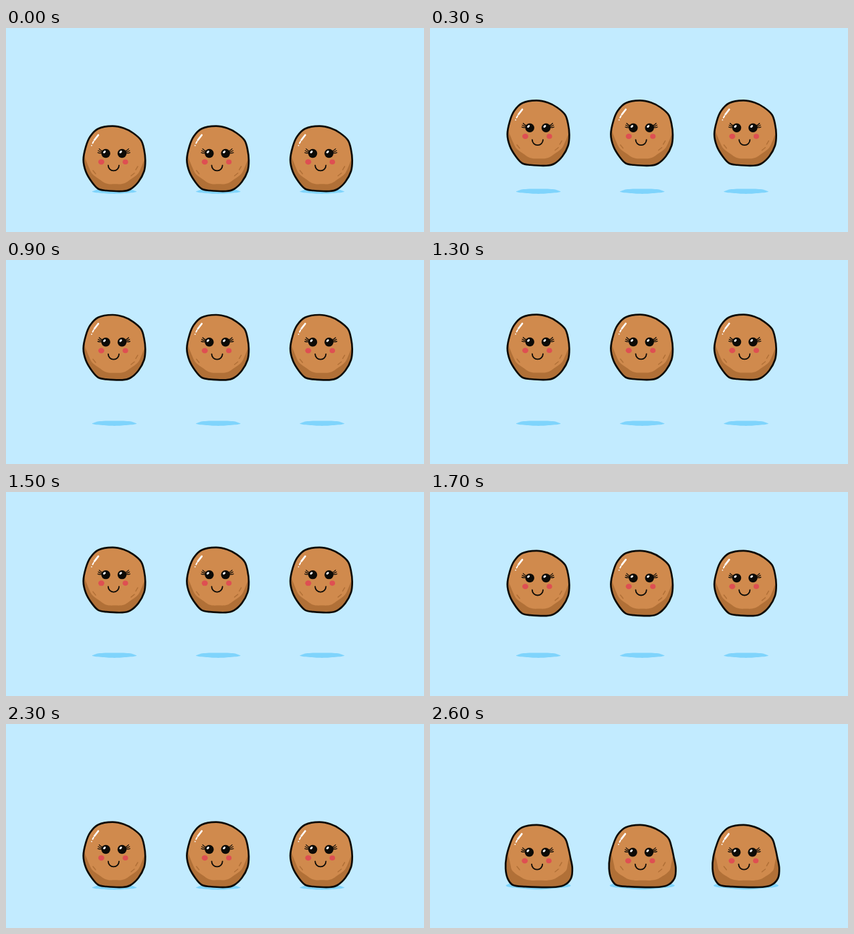
These frames come from a looping animation (625x305 px, 2700 ms). An HTML page with a canvas:

```html
<!DOCTYPE html>
<html lang="en">
<head>
<meta charset="utf-8">
<title>Bouncing dough balls</title>
<style>
  html, body { margin: 0; width: 100%; height: 100%; overflow: hidden; background: #c2ebff; }
  canvas { display: block; }
</style>
</head>
<body>
<canvas id="stage" width="625" height="305"></canvas>
<script>
const ctx = document.getElementById('stage').getContext('2d');

const STEP = 100, COUNT = 27, AIR = 24;
const BALL_PITCH = 154.7, SHADOW_PITCH = 155.3;
const MID = 162, FLOOR = 244;
const SKY = '#c2ebff', INK = '#0d0b07', DOUGH = '#d08a4d';
const SHADE = '#b17037', GROUND = '#7fd4fc', CHEEK = '#de4f52';

// Key points of the hand-drawn outline
const OUTLINE = [
  [159, 146.7], [176, 149.8], [190, 157], [202, 168], [206.5, 182], [208.3, 198],
  [206.5, 214], [198, 230], [186, 241], [174, 244], [150, 243], [138, 240.5],
  [128.5, 230.5], [119.5, 215], [115.7, 197], [119.5, 177], [126, 162], [138, 150.5]
];

// Cubic ease-out on the way up, mirrored on the way down
function liftAt(n) {
  const u = (10.7 - Math.min(n, AIR - 1 - n)) / 10.35;
  return Math.max(0, 65 * (1 - u ** 3));
}

const squashAt = n => 1.4 - 0.4 * Math.abs(n - AIR - 1);

// Lowers the top and spreads the dough towards the floor
function squash([x, y], k) {
  const spread = 0.7 * k * Math.max(0, (y - 170) / 75) ** 3;
  return [MID + (x - MID) * (1 + spread), FLOOR - (FLOOR - y) * (1 - 0.043 * k)];
}

// Ellipse with a slightly uneven edge
function blob(cx, cy, rx, ry, wobble, waves) {
  return Array.from({ length: 36 }, (_, i) => {
    const a = i * Math.PI / 18, r = 1 + wobble * Math.sin(a * waves);
    return [cx + rx * r * Math.cos(a), cy + ry * r * Math.sin(a)];
  });
}

// Smooth closed curve through the points
function curve(pts) {
  const n = pts.length, path = new Path2D();
  path.moveTo(...pts[0]);
  for (let i = 0; i < n; i++) {
    const [a, b, c, d] = [n - 1, 0, 1, 2].map(j => pts[(i + j) % n]);
    path.bezierCurveTo(
      b[0] + (c[0] - a[0]) / 6, b[1] + (c[1] - a[1]) / 6,
      c[0] - (d[0] - b[0]) / 6, c[1] - (d[1] - b[1]) / 6, c[0], c[1]);
  }
  path.closePath();
  return path;
}

function fill(path, color) {
  ctx.fillStyle = color;
  ctx.fill(path);
}

function line(path, width, color) {
  ctx.lineWidth = width;
  ctx.strokeStyle = color;
  ctx.stroke(typeof path === 'string' ? new Path2D(path) : path);
}

function oval(x, y, rx, ry, color, turn = 0) {
  const path = new Path2D();
  path.ellipse(x, y, rx, ry, turn, 0, Math.PI * 2);
  fill(path, color);
}

function shadow(k) {
  const spread = Math.min(1, k);
  fill(curve(blob(MID, 244 - 3.5 * spread, 32.5 + 15 * k, 3.7 + 3 * spread, 0.05, 5)), GROUND);
}

function body(k) {
  const shape = pts => curve(pts.map(p => squash(p, k)));
  const edge = shape(OUTLINE);
  ctx.save();
  ctx.clip(edge);
  fill(edge, SHADE);
  fill(shape(blob(163, 185, 45, 49, 0.013, 11)), DOUGH);
  line('M130 213l4 5M187 221l5-4M194 212l3-5', 1.5, SHADE);
  ctx.restore();
  line(edge, 2.7, INK);
}

function eye(x, y, side) {
  oval(x, y, 6.7, 6.7, INK);
  oval(x - 2, y - 2.2, 2.3, 1.5, '#fff', -0.7);
  for (let i = 0; i < 3; i++) {
    const a = 0.1 + i * 0.25, dx = side * Math.cos(a), dy = -Math.sin(a);
    line(`M${x + 6 * dx} ${y + 6 * dy}Q${x + 9.5 * dx} ${y + 9.5 * dy + 1} ${x + 12 * dx} ${y + 12 * dy}`, 1.2, INK);
  }
}

function face(k) {
  ctx.save();
  ctx.translate(-0.8 * k, 4.3 * k);
  line('M138 160L132.2 167.5', 2.7, '#fff');
  line('M131 169.5L129.5 172.3', 1.9, '#fff');
  oval(128, 175.7, 0.9, 0.9, '#fff');
  oval(142.5, 200.2, 4.5, 4, CHEEK);
  oval(178.5, 200.2, 4.1, 3.8, CHEEK);
  eye(149.2, 187.5, -1);
  eye(173.5, 187.5, 1);
  line('M152.8 205.3A8.1 8.1 0 0 0 169 205.3', 1.8, INK);
  ctx.restore();
}

function place(x, y, paint, k) {
  ctx.save();
  ctx.translate(x, y);
  paint(k);
  ctx.restore();
}

function draw(time) {
  const n = Math.floor(time / STEP) % COUNT;
  const flying = n < AIR;
  const lift = flying ? liftAt(n) : 0, k = flying ? 0 : squashAt(n);

  ctx.fillStyle = SKY;
  ctx.fillRect(0, 0, 625, 305);
  ctx.lineCap = ctx.lineJoin = 'round';

  for (let i = 0; i < 3; i++) {
    place(i * SHADOW_PITCH, 0, shadow, k);
    place(i * BALL_PITCH, -lift, body, k);
    place(i * BALL_PITCH, -lift, face, k);
  }
}

function tick() {
  draw(performance.now());
  requestAnimationFrame(tick);
}
tick();
</script>
</body>
</html>
```
